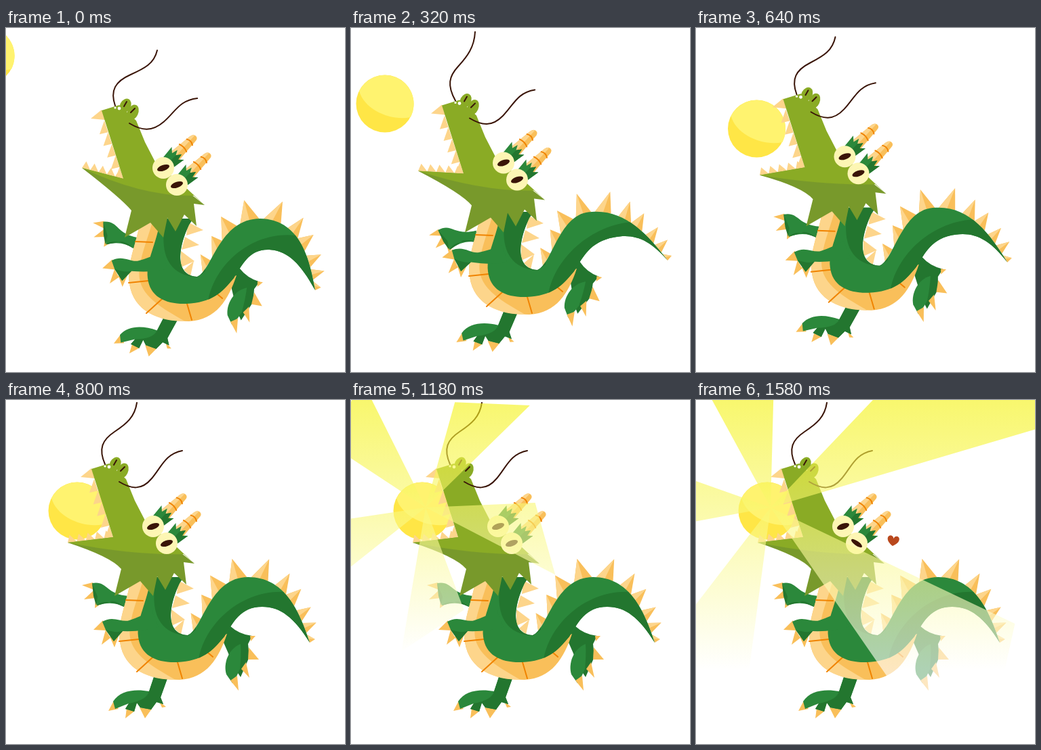
Recreate the animation shown at these times as an HTML page with a canvas. Size 500 px wide and 509 px high, loop 2.58 s.

```html
<!DOCTYPE html>
<html lang="en">
<head>
<meta charset="utf-8">
<title>Dragon and pearl</title>
<style>
  html, body { margin: 0; width: 100%; height: 100%; overflow: hidden; background: #fff; }
  canvas { display: block; width: 500px; height: 509px; }
</style>
</head>
<body>
<canvas id="stage"></canvas>
<script>
const W = 500, H = 509, LOOP = 2580;
const canvas = document.getElementById('stage');
const ctx = canvas.getContext('2d');
const ratio = window.devicePixelRatio || 1;
canvas.width = W * ratio;
canvas.height = H * ratio;

const C = {
  green: '#2b883b', shade: '#23762f', head: '#8aab25', beard: '#78992b',
  peach: '#fdd58b', amber: '#f9bf5a', orange: '#f08300',
  eye: '#fdf6b4', dark: '#3a1508', pearl: '#fff36f', pearlShade: '#ffe646', heart: '#b9481d'
};

const fill = (color, d) => { ctx.fillStyle = color; ctx.fill(new Path2D(d)); };
const line = (color, width, d) => {
  ctx.strokeStyle = color;
  ctx.lineWidth = width;
  ctx.lineCap = 'round';
  ctx.stroke(new Path2D(d));
};
const tri = (color, ...p) => fill(color, `M${p.join(' ')}Z`);
const oval = (color, x, y, rx, ry = rx, deg = 0) => {
  ctx.fillStyle = color;
  ctx.beginPath();
  ctx.ellipse(x, y, rx, ry, deg * Math.PI / 180, 0, 7);
  ctx.fill();
};
const at = (x, y, deg, paint) => {
  ctx.save();
  ctx.translate(x, y);
  ctx.rotate(deg * Math.PI / 180);
  paint();
  ctx.restore();
};
// Turn a limb around its joint.
const turn = (x, y, deg, paint) => at(x, y, deg, () => { ctx.translate(-x, -y); paint(); });

// Pose values are given at these steps.
const KEYS = [0, 4, 6, 10];
function pose(n, ...v) {
  let i = 0;
  while (i < 2 && n > KEYS[i + 1]) i++;
  const u = (n - KEYS[i]) / (KEYS[i + 1] - KEYS[i]);
  return v[i] + (v[i + 1] - v[i]) * u;
}

function bezier([a, b, c, d], t) {
  const s = 1 - t;
  return [0, 1].map(i => s * s * s * a[i] + 3 * s * s * t * b[i] + 3 * s * t * t * c[i] + t * t * t * d[i]);
}

// curve, start, end, height, lean along the curve
const SPIKES = [
  [0, .13, .32, 17, 10], [0, .36, .56, 17, 12], [0, .56, .77, 26, 9], [0, .81, .99, 32, 0],
  [1, .03, .21, 32, 7], [1, .3, .46, 27, -6], [1, .46, .61, 23, -4],
  [1, .66, .78, 21, -4], [1, .8, .9, 19, -1], [1, .92, 1, 9, 4]
];

function spikes(curves) {
  for (const [c, t0, t1, h, lean] of SPIKES) {
    const a = bezier(curves[c], t0), b = bezier(curves[c], t1);
    const dx = b[0] - a[0], dy = b[1] - a[1], len = Math.hypot(dx, dy);
    const mid = [(a[0] + b[0]) / 2, (a[1] + b[1]) / 2];
    const tip = [mid[0] + (dy * h + dx * lean) / len, mid[1] + (-dx * h + dy * lean) / len];
    tri(C.amber, a, tip, b);
    tri(C.peach, a, tip, mid);
  }
}

function teeth(a, b, count, h, bias) {
  const dx = (b[0] - a[0]) / count, dy = (b[1] - a[1]) / count, len = Math.hypot(dx, dy);
  for (let i = 0; i < count; i++) {
    const x = a[0] + dx * i, y = a[1] + dy * i;
    tri(C.peach, [x, y], [x + dx * bias + dy * h / len, y + dy * bias - dx * h / len], [x + dx, y + dy]);
  }
}

function pearl(n) {
  at(pose(n, -30, 50, 74, 105), pose(n, 41, 112, 134, 164), 0, () => {
    oval(C.pearlShade, 0, 0, 42.5);
    fill(C.pearl, 'M-38 -19A42.5 42.5 0 1 1 38 20C10 26 -30 10 -38 -19Z');
  });
}

function farLeg() {
  fill(C.shade, 'M318 352L330 334Q344 347 363 349L357 361L359 380L346 410L338 398Z');
  fill(C.green, 'M346 361C328 368 320 390 325 406L334 419L341 407L345 398Q347 378 346 361Z');
  tri(C.amber, [360, 349], [368, 349], [361, 357]);
  tri(C.amber, [358, 366], [373, 384], [357, 384]);
  tri(C.amber, [347, 398], [359, 411], [354, 388]);
  tri(C.amber, [331, 415], [343, 430], [341, 408]);
}

function nearLeg() {
  tri(C.amber, [159, 445], [151, 460], [166, 457]);
  tri(C.amber, [178, 456], [176, 471], [190, 460]);
  tri(C.amber, [197, 455], [205, 471], [215, 457]);
  tri(C.amber, [226, 446], [236, 454], [230, 455]);
  fill(C.green, 'M158 446C168 430 190 427 211 431L218 410L238 412L228 440L232 450L222 447L214 458L198 455L193 448L189 461L176 457L181 449L161 457Z');
  fill(C.shade, 'M218 410L238 412L228 440L232 450L222 447L214 458L198 455L193 448L189 461L176 457L181 449Q208 444 211 431Z');
}

function farArm() {
  tri(C.amber, [128, 270], [112, 274], [130, 281]);
  tri(C.amber, [129, 282], [115, 295], [132, 293]);
  tri(C.amber, [132, 294], [131, 308], [141, 301]);
  fill(C.green, 'M127 271C150 267 146 287 180 290L176 307Q158 296 134 304Z');
  fill(C.shade, 'M127 271L135 291L133 304L129 290ZM134 304Q146 292 176 307Q158 294 153 299Z');
}

function nearArm() {
  tri(C.amber, [143, 326], [129, 340], [148, 341]);
  tri(C.amber, [147, 340], [141, 362], [154, 352]);
  tri(C.amber, [153, 350], [160, 366], [167, 347]);
  fill(C.green, 'M142 328C158 318 171 330 182 326Q200 320 215 311L225 336Q202 343 172 342L159 357L147 340Z');
  fill(C.shade, 'M147 340Q162 345 172 342L159 357Z');
}

function torso(n) {
  const dx = pose(n, -6, 12, 17, 0), dy = pose(n, 9, -25, -32, 0);
  const move = (x, y, kx, ky = kx) => [x + dx * kx, y + dy * ky];
  const peak = move(357, 262, -.7, 0), tip = move(448, 359, 1);
  const c1 = move(410, 262, -1.2, .15), c2 = move(432, 310, -.2, .65);
  spikes([[[268, 348], [290, 340], [300, 262], peak], [peak, c1, c2, tip]]);
  tri(C.peach, [254, 267], [277, 279], [252, 287]);
  tri(C.peach, [250, 289], [271, 301], [245, 308]);
  tri(C.peach, [244, 310], [264, 325], [244, 334]);
  tri(C.peach, [248, 338], [263, 325], [258, 347]);

  turn(325, 335, pose(n, 10, 14, 12, 0), farLeg);
  turn(232, 415, pose(n, 9, 3.5, 19, 0), nearLeg);
  turn(178, 297, pose(n, 5, -19, -2.5, 0), farArm);

  fill(C.amber, 'M184 265C180 295 163 330 168 358C174 400 212 414 256 414C296 412 314 382 326 346L250 375L220 260Z');
  fill(C.peach, 'M184 265C180 295 163 330 168 358C174 400 212 414 250 414C210 391 177 372 183 335C186 310 198 285 203 262Z');
  line(C.orange, 2, 'M177 296L202 297M167 357L196 354M193 402L216 381M253 388L260 412M291 368L305 380');

  const shape = new Path2D(`M214 262C208 300 192 325 195 350C198 378 222 389 252 388C290 386 304 372 322 350
    C335 330 345 306 ${move(378, 306, .25)}C${move(405, 306, .5)} ${move(425, 322, .75)} ${tip}
    C${c2} ${c1} ${peak}C300 262 290 340 268 348C234 346 240 305 256 271L262 262Z`);
  ctx.save();
  ctx.clip(shape);
  ctx.fillStyle = C.green;
  ctx.fillRect(180, 250, 320, 150);
  fill(C.shade, `M283 392C288 335 345 280 ${move(412, 284, 0, .3)}L490 270L490 400Z`);
  fill(C.shade, 'M223 255C214 295 213 345 268 349L280 340L270 250Z');
  ctx.restore();
  turn(215, 322, pose(n, 3, 7, 0, 0), nearArm);
}

function horn(x, y) {
  at(x, y, -43.5, () => {
    fill(C.amber, 'M15 -9L54 -6Q61 -5 61 0Q61 5 54 5L15 9Z');
    fill(C.peach, 'M15 -9L54 -6Q60 -5 60 -2L15 1Z');
    line(C.orange, 2, 'M35 -8Q38 0 35 7M48 -6Q52 0 48 6');
    fill(C.green, 'M0 -10L24 -13L18 -6L27 -4L20 0L27 5L18 7L24 13L0 10Z');
    fill(C.shade, 'M0 1L20 0L27 5L18 7L24 13L0 10Z');
  });
}

function headPart(n, wink) {
  const jaw = [pose(n, 97, 91, 92, 91), pose(n, 187, 199, 218, 211)];
  const corner = [158, 203];
  teeth(jaw, corner, 5, 11, .3);
  teeth([130, 117], corner, 5, -13, .95);
  tri(C.peach, [126, 101], [110, 114], [131, 116]);

  fill(C.beard, `M${jaw}Q155 232 170 250L160 290L198 268L217 290L223 261L235 281L248 256L266 273L262 240L278 242L240 212L${corner}Z`);
  horn(221, 182);
  horn(242, 208);
  oval(C.head, 161, 95, 8, 11, 28);
  oval(C.head, 172, 105, 8, 12, 24);
  fill(C.head, `M${corner}L126 102L152 94L177 117L190 149L206 180L250 216L278 242L262 228Q187 230 ${jaw}Z`);
  line(C.dark, 2, 'M159 96L163 89M169 105L175 99');
  oval('#fff', 146, 98, 1.6);
  oval('#fff', 152, 99, 2.4);

  oval(C.eye, 217, 187, 16);
  oval(C.eye, 237, 212, 16);
  oval(C.dark, 217, 187, 9.5, 4.2, -20);
  oval(C.dark, 237, 212, 9.5, wink ? 3.4 : 4.2, wink ? 35 : -20);

  const s = pose(n, 15, -18, 20, 0), r = pose(n, 9, 4, 6, 0);
  line(C.dark, 2, `M146 95C${136 + s * .15} 72 ${142 + s * .3} 59 ${160 + s * .55} ${47 + s * .15}S${190 + s * .9} ${25 + s * .5} ${193 + s} ${4 + s * .6}`);
  line(C.dark, 2, `M167 121C185 132 200 134 ${215 + r * .3} ${116 + r * .3}S${235 + r * .6} ${80 + r * .8} ${260 + r * .8} ${75 + r}`);
}

function rays(k) {
  if (!k) return;
  const cx = 110, cy = 159, long = 4.4 * k * k, short = long * .75;
  const g = ctx.createLinearGradient(0, Math.max(0, cy - long), 0, Math.min(400, cy + long));
  g.addColorStop(0, 'rgba(244,242,20,.62)');
  g.addColorStop(1, 'rgba(255,255,255,.62)');
  const end = (deg, len) => [cx + len * Math.cos(deg * Math.PI / 180), cy + len * Math.sin(deg * Math.PI / 180)];
  for (let i = 0; i < 5; i++) {
    const a = 49.5 + 25 * (k - 5) + 72 * i;
    ctx.fillStyle = g;
    ctx.fill(new Path2D(`M${cx} ${cy}L${end(a - 30, short)}L${end(a, long)}Z`));
  }
}

function draw(t) {
  const n = Math.min(10, Math.floor(t / 80));
  const k = t < 880 ? 0 : Math.min(11, Math.floor((t - 830) / 50));
  const love = t >= 1580;
  ctx.setTransform(ratio, 0, 0, ratio, 0, 0);
  ctx.fillStyle = '#fff';
  ctx.fillRect(0, 0, W, H);
  pearl(n);
  at(pose(n, 14, 7, 5.5, 0), pose(n, 20, 10, 7.5, 0), 0, () => torso(n));
  at(pose(n, 15, 8, 5, 0), pose(n, 20, 12.5, 6.5, 0), 0, () => headPart(n, love));
  rays(k);
  if (love) at(291, 208, 8, () => fill(C.heart, 'M0 8C-11 2 -10 -6 -5 -7Q-1 -7 0 -3Q1 -7 5 -7C10 -6 11 2 0 8Z'));
}

const start = performance.now();
function tick() {
  draw((performance.now() - start) % LOOP);
  requestAnimationFrame(tick);
}
tick();
</script>
</body>
</html>
```
